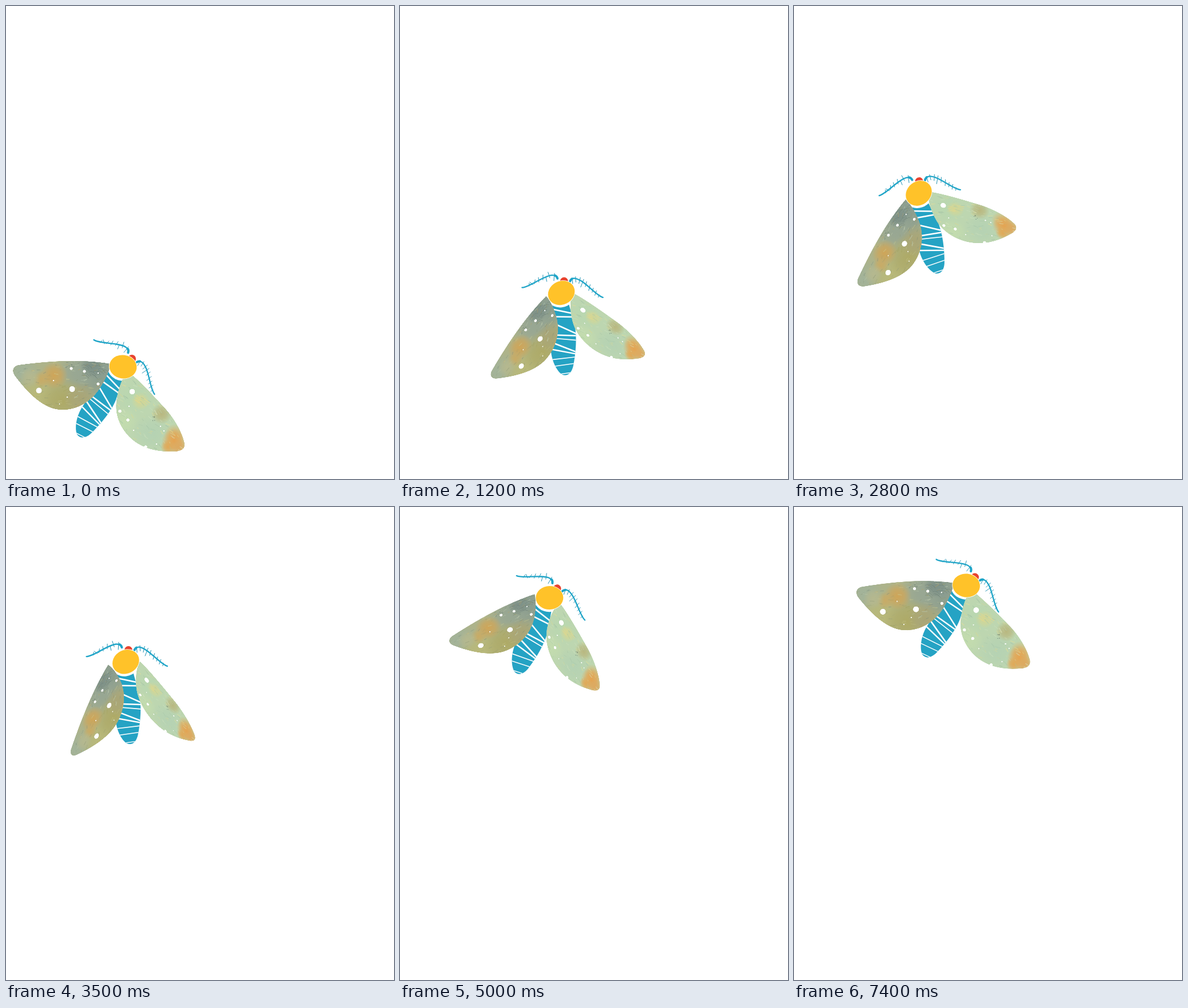
An HTML page with a canvas for the animation above (7500 ms loop, 678 by 826 pixels).

```html
<!DOCTYPE html>
<html lang="en">
<head>
<meta charset="utf-8">
<title>Moth</title>
<style>
html, body { margin: 0; width: 100%; height: 100%; overflow: hidden; background: #fff; }
canvas { display: block; width: 678px; height: 826px; }
</style>
</head>
<body>
<canvas id="stage" width="678" height="826"></canvas>
<script>
const ctx = document.getElementById('stage').getContext('2d');
const RAD = Math.PI / 180;
const STEP = 100, STEPS = 75;
const HEAD = [204.5, 630];
const BLUE = '#25a3c4';

// Flight path: step, head x, head y, turn in degrees
const PATH = [
  [0, 204.5, 630, 0], [4, 224, 612, -11], [8, 260, 556, -28], [12, 282, 501, -34.9],
  [16, 265, 443, -48], [20, 233.5, 391, -58.5], [24, 222, 358, -53], [28, 218, 327, -46],
  [32, 212, 295, -40], [36, 209, 262, -33.5], [40, 211, 229, -27], [42, 215, 214, -23.8],
  [45, 231, 191, -17], [48, 247, 170, -12], [52, 276, 149, -6], [56, 301, 137, -1.7],
  [74, 301, 137, -1.7]
];
// Wing fold: step, amount (0 open, 1 closed)
const FLAP = [[0, 0], [7, 1], [15, 0], [22, 1], [30, 0], [38, 1], [45, 0], [59, 1], [74, 0]];

const shape = d => new Path2D(d);
const BODY = shape('M181 636C165 662 143 684 132 702C122 719 120 738 124 748C130 757 140 754 148 747C165 731 184 708 192 688C198 670 202 660 206 648Z');
const FEELERS = [
  {
    line: shape('M213.5 606C215 596 206 593 195 591C180 588 160 588 153.5 583'),
    base: shape('M213.3 605.5Q214.6 602 213 599'),
    hairs: [[165, 588, 168, 584], [170, 583, 172, 590], [175, 590, 180, 585], [183, 592, 187, 585],
      [191, 593, 196, 586], [195, 599, 198, 592], [203, 597, 206, 587], [206, 605, 214, 595]]
  },
  {
    line: shape('M228 622.5C236 617 241 624 245 633C251 648 253 670 259.5 678'),
    base: shape('M228.2 622.2Q231 620.3 234 620.5'),
    hairs: [[230, 628, 234, 621], [236, 629, 241, 621], [239, 634, 247, 627], [238, 641, 250, 633],
      [245, 645, 252, 639], [246, 654, 254, 647], [249, 660, 255, 655], [250, 667, 257, 662], [253, 673, 257, 670]]
  }
];
// Body bands in upright coordinates around the head: x1, y1, x2, y2, width
const BANDS = [
  [-18, 28, 20, 36, 2.5], [-16, 41.5, 22, 42, 2.5], [-14, 53, 28, 72, 2.5], [-14, 73.5, 30, 75, 2.5],
  [-16, 79, 30, 83, 1.6], [-18, 86, 28, 104, 2.6], [-20, 98, 28, 107, 2.4], [-20, 117, 28, 111.5, 1.6],
  [-18, 129, 28, 122.5, 1.5], [-10, 143, 22, 138.5, 1.4]
];

const LEFT = {
  outline: shape('M183 625C160 621 130 619 100 620C70 621 45 624 22 627C12 629 10 637 15 645C35 672 65 705 97 705C125 706 150 690 165 666C175 650 181 636 183 625Z'),
  pivot: [159.5, 633], axis: 0, turn: -49, squash: 0.47, skew: 16,
  base: '#adb38a', box: [10, 615, 175, 92], grain: 170, seed: 7,
  blobs: [[160, 638, 55, '#869a90'], [125, 640, 38, '#98a793'], [25, 638, 36, '#a2b39a'],
    [55, 680, 40, '#b9b979'], [100, 690, 42, '#aeaa66'], [130, 685, 30, '#a9a577'],
    [84, 645, 24, '#cfa558'], [62, 652, 15, '#c8ab66'], [42, 648, 18, '#b5b88f'], [150, 630, 20, '#7d9087']],
  paints: ['#c9c98f', '#8f9b78', '#c49f54', '#bcc9ad', '#75877a', '#a1a05f'],
  dots: [[57.5, 671.5, 5], [115.5, 669, 5], [114, 633, 2.6], [137, 638, 2.6], [161, 660, 2.6],
    [161, 641, 1.2], [107, 683, 1], [93.5, 695, 1], [83, 654, 1]]
};
const RIGHT = {
  outline: shape('M212 638C225 646 255 677 280 705C295 722 308 745 312 764C313 774 306 778 292 778C262 779 235 772 215 752C198 734 190 712 193 690C196 668 202 652 212 638Z'),
  pivot: [213.1, 670.7], axis: 50, turn: 60, squash: 0.57, skew: 7,
  base: '#bdd6b0', box: [190, 640, 122, 138], grain: 170, seed: 23,
  blobs: [[225, 685, 30, '#b9d7b0'], [205, 725, 26, '#c3dcae'], [235, 690, 16, '#d2d696'],
    [255, 745, 34, '#b5d2b3'], [272, 712, 18, '#b9b77f'], [295, 748, 18, '#d5b875'],
    [294, 760, 22, '#e5a350'], [283, 770, 13, '#e0a958'], [302, 770, 15, '#dda95f']],
  paints: ['#e7de94', '#a2c4a6', '#d9e6c4', '#dcd58a', '#9fbda2', '#cfe2c0'],
  dots: [[220.5, 673.5, 4.8], [199, 707.5, 2.7], [213, 723, 2.7], [244, 770, 2.7], [215, 699, 1],
    [270, 734, 1.2], [263, 765, 1], [276, 742, 1], [223, 741, 1]]
};

function seeded(s) {
  return () => (s = (s * 16807) % 2147483647) / 2147483647;
}

function line(c, x1, y1, x2, y2, w) {
  c.lineWidth = w;
  c.beginPath();
  c.moveTo(x1, y1);
  c.lineTo(x2, y2);
  c.stroke();
}

function oval(c, x, y, rx, ry, turn, color) {
  c.fillStyle = color;
  c.beginPath();
  c.ellipse(x, y, rx, ry, turn, 0, 7);
  c.fill();
}

function blob(c, [x, y, r, color]) {
  const g = c.createRadialGradient(x, y, 0, x, y, r);
  g.addColorStop(0, color);
  g.addColorStop(0.5, color + 'b0');
  g.addColorStop(1, color + '00');
  c.fillStyle = g;
  c.fillRect(x - r, y - r, 2 * r, 2 * r);
}

// Paints a wing once onto its own canvas, which covers 340 x 200 from (0, 600)
function paintWing(wing) {
  const tex = document.createElement('canvas');
  tex.width = 1020;
  tex.height = 600;
  const c = tex.getContext('2d');
  const rnd = seeded(wing.seed);
  const [bx, by, bw, bh] = wing.box;
  c.scale(3, 3);
  c.translate(0, -600);
  c.clip(wing.outline);
  c.fillStyle = wing.base;
  c.fillRect(bx - 10, by - 10, bw + 20, bh + 20);
  wing.blobs.forEach(b => blob(c, b));
  c.lineCap = 'round';
  for (let i = 0; i < wing.grain; i++) {
    const x = bx + rnd() * bw, y = by + rnd() * bh;
    const a = (wing.axis - 35 + rnd() * 50) * RAD, len = 2 + rnd() * 7;
    c.globalAlpha = 0.2 + rnd() * 0.3;
    c.strokeStyle = wing.paints[i % wing.paints.length];
    line(c, x, y, x + len * Math.cos(a), y + len * Math.sin(a), 0.5 + rnd() * 1.3);
  }
  c.globalAlpha = 0.45;
  if (wing === LEFT) {
    // Dark brushed hairs near the root
    c.strokeStyle = '#66786f';
    for (let i = 0; i < 16; i++) {
      const x = 132 + rnd() * 38, y = 622 + rnd() * 24;
      c.lineWidth = 0.5 + rnd() * 0.5;
      c.beginPath();
      c.moveTo(x, y);
      c.quadraticCurveTo(x + 6, y - 3, x + 12, y + 5);
      c.stroke();
    }
    for (let i = 0; i < 12; i++) oval(c, 104 + rnd() * 20, 622 + rnd() * 10, 0.5 + rnd(), 0.7, 0, '#66786f');
  } else {
    c.strokeStyle = '#e9d886';
    for (let i = 0; i < 14; i++) {
      const x = 222 + rnd() * 26, y = 678 + rnd() * 14;
      line(c, x, y, x + 8, y + 6, 0.9);
    }
    for (let i = 0; i < 6; i++) oval(c, 256 + rnd() * 4, 717 + rnd() * 7, 0.9, 0.7, 0, '#4f625c');
  }
  c.globalAlpha = 1;
  wing.dots.forEach(([x, y, r]) => oval(c, x, y, r, r, 0, '#fff'));
  return tex;
}
[LEFT, RIGHT].forEach(w => w.tex = paintWing(w));

function spanAt(keys, n) {
  let i = 0;
  while (i < keys.length - 2 && n >= keys[i + 1][0]) i++;
  return i;
}

function flapAt(n) {
  const i = spanAt(FLAP, n), [a, p] = FLAP[i], [b, q] = FLAP[i + 1];
  return p + (q - p) * (n - a) / (b - a);
}

// Smooth curve through the path; it rests at both ends
function bodyAt(n) {
  const i = spanAt(PATH, n), a = PATH[i], b = PATH[i + 1];
  const h = b[0] - a[0], u = (n - a[0]) / h;
  const slope = (j, k) => j < 1 || j > PATH.length - 3 ? 0 :
    (PATH[j + 1][k] - PATH[j - 1][k]) / (PATH[j + 1][0] - PATH[j - 1][0]);
  return [1, 2, 3].map(k => {
    const v = u * u * (3 - 2 * u);
    return a[k] + (b[k] - a[k]) * v +
      h * u * (1 - u) * (slope(i, k) * (1 - u) - slope(i + 1, k) * u);
  });
}

function drawWing(wing, p) {
  const s = 1 - wing.squash * p, k = wing.skew * p * p * RAD;
  const [x, y] = wing.pivot;
  ctx.save();
  ctx.translate(x, y);
  ctx.rotate((wing.axis + wing.turn * p) * RAD);
  ctx.transform(1, 0, s * Math.sin(k), s * Math.cos(k), 0, 0);
  ctx.rotate(-wing.axis * RAD);
  ctx.translate(-x, -y);
  ctx.drawImage(wing.tex, 0, 600, 340, 200);
  ctx.restore();
}

function drawBody() {
  ctx.save();
  ctx.fillStyle = BLUE;
  ctx.fill(BODY);
  ctx.clip(BODY);
  ctx.translate(...HEAD);
  ctx.rotate(34.9 * RAD);
  ctx.strokeStyle = '#fff';
  BANDS.forEach(b => line(ctx, ...b));
  ctx.restore();
  oval(ctx, 203.8, 631.5, 26.5, 23, 8 * RAD, '#fff');
}

function drawHead() {
  ctx.lineCap = 'round';
  for (const f of FEELERS) {
    ctx.strokeStyle = '#1b8fb0';
    f.hairs.forEach(h => line(ctx, ...h, 0.9));
    ctx.strokeStyle = '#1fa5c8';
    ctx.lineWidth = 2.3;
    ctx.stroke(f.line);
    ctx.lineWidth = 4;
    ctx.stroke(f.base);
  }
  oval(ctx, 220, 616, 7, 7, 0, '#e8432e');
  oval(ctx, 204.5, 630, 24.8, 21.3, 8 * RAD, '#fff');
  oval(ctx, 204.5, 630, 24, 20.5, 8 * RAD, '#ffc229');
}

function draw(n) {
  const [x, y, turn] = bodyAt(n), p = flapAt(n);
  ctx.fillStyle = '#fff';
  ctx.fillRect(0, 0, 678, 826);
  ctx.save();
  ctx.translate(x, y);
  ctx.rotate(turn * RAD);
  ctx.translate(-HEAD[0], -HEAD[1]);
  drawBody();
  drawWing(LEFT, p);
  drawWing(RIGHT, p);
  drawHead();
  ctx.restore();
}

const start = performance.now();
function tick() {
  draw(Math.floor(Math.max(0, performance.now() - start) / STEP) % STEPS);
  requestAnimationFrame(tick);
}
tick();
</script>
</body>
</html>
```
